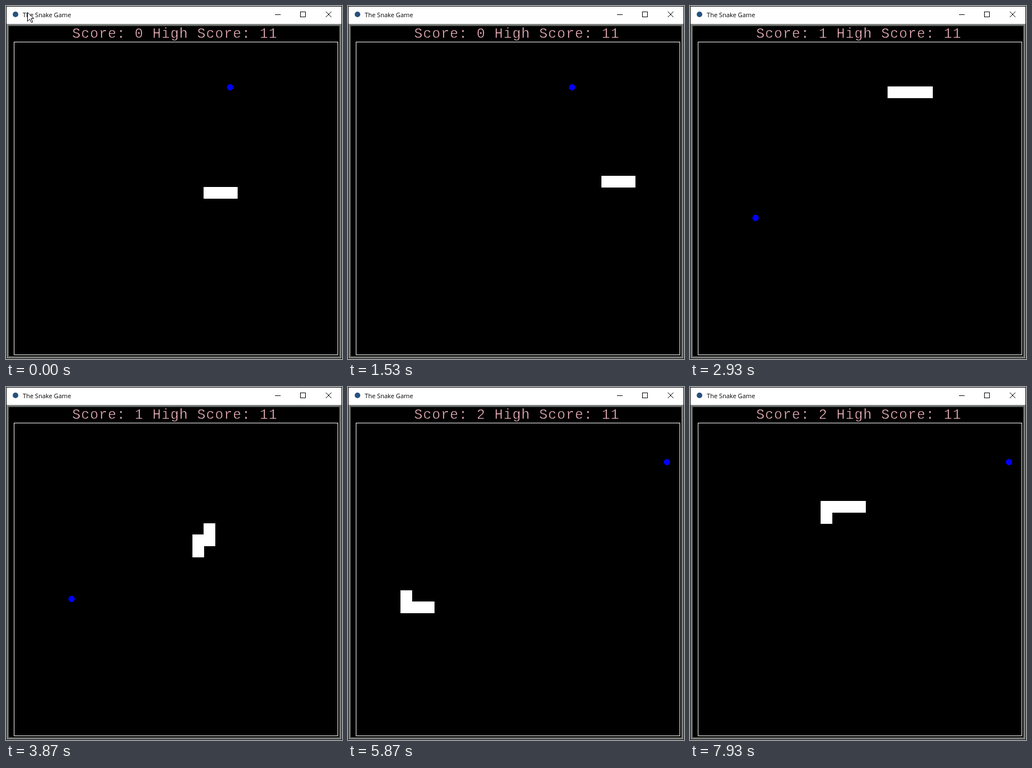
These frames come from a looping animation (602 by 632 pixels, 8 s). An HTML page:

```html
<!DOCTYPE html>
<html lang="en">
<head>
<meta charset="utf-8">
<title>The Snake Game</title>
<style>
  html, body { margin: 0; width: 100%; height: 100%; overflow: hidden; background: #000; }
  svg { display: block; }
  .title { font: 11.1px "Open Sans", "Noto Sans", sans-serif; }
  /* the black stroke thins the letters */
  .score { font: 25px "Liberation Mono", monospace; letter-spacing: 1px; white-space: pre;
           fill: pink; stroke: #000; stroke-width: .6px; }
  .line { fill: none; stroke: #000; }
  .frame { fill: none; stroke-width: 2; }
</style>
</head>
<body>
<svg width="602" height="632" viewBox="0 0 602 632">
  <rect width="602" height="632"/>
  <rect x="1" y="1" width="600" height="31" fill="#fff"/>
  <circle cx="17" cy="15" r="5" fill="#27517d"/>
  <text class="title" x="30" y="20">The Snake Game</text>
  <g class="line">
    <path d="M482 15.5h10M527.5 10.5h9v9h-9z" shape-rendering="crispEdges"/>
    <path d="M573 10l10 10M583 10l-10 10"/>
  </g>
  <rect class="frame" x="2" y="33" width="598" height="597" stroke="#868886"/>
  <rect class="frame" x="4" y="35" width="594" height="593" stroke="#5c605c"/>
  <text class="score" id="score" x="118.5" y="57"></text>
  <g shape-rendering="crispEdges">
    <rect x="14.5" y="64.5" width="580" height="560" fill="none" stroke="#fff"/>
    <path id="snake" fill="#fff"/>
    <circle id="food" r="5.5" fill="#00f"/>
  </g>
  <path id="pointer" d="M38.5 11.5v16l4-4 3 6 2.500-1-3-6h5z" fill="#fff" stroke="#000"/>
</svg>
<script>
const LOOP = 8000, CELL = 20;
const byId = id => document.getElementById(id);
const snake = byId("snake"), food = byId("food"), score = byId("score"), pointer = byId("pointer");

// Route of the head: direction and number of cells; the first two cells form the starting body.
const route = "R2 R8 U1 L5 U8 L5 D6 L1 D6 L12 U1 R7 U8 R3";
const dirs = { R: [1, 0], L: [-1, 0], U: [0, -1], D: [0, 1] };
const cells = [[354, 324]];
for (const run of route.split(" ")) {
  const [dx, dy] = dirs[run[0]];
  for (let i = +run.slice(1); i > 0; i--) {
    const [x, y] = cells[cells.length - 1];
    cells.push([x + dx * CELL, y + dy * CELL]);
  }
}

// The screen refreshes 15 times a second; the game moves every 5/3 refreshes and lags a little.
const lags = [33, 43, 58, 66];
const stepTimes = cells.slice(3).map((_, i) => {
  const n = i + 1;
  const tick = Math.floor((5 * n - 1 + lags.filter(l => l <= n).length) / 3);
  return Math.round(tick * 20 / 3) * 10;
});

const meals = [25, 53];
const foods = [[401.5, 145.5], [117.5, 379.5], [571.5, 134.5]];

function draw(now) {
  const t = now % LOOP;
  const step = stepTimes.filter(s => s <= t).length;
  const eaten = meals.filter(m => m <= step).length;
  const length = 3 + meals.filter(m => m < step).length;
  snake.setAttribute("d", cells.slice(step + 3 - length, step + 3)
    .map(([x, y]) => `M${x} ${y}h21v21h-21z`).join(""));
  food.setAttribute("cx", foods[eaten][0]);
  food.setAttribute("cy", foods[eaten][1]);
  const label = `Score: ${eaten} High Score: 11`;
  if (score.textContent !== label) score.textContent = label;
  pointer.style.display = step ? "none" : "";
}

let start;
function frame(now) {
  start ??= now;
  draw(now - start);
  requestAnimationFrame(frame);
}
draw(0);
requestAnimationFrame(frame);
</script>
</body>
</html>
```
